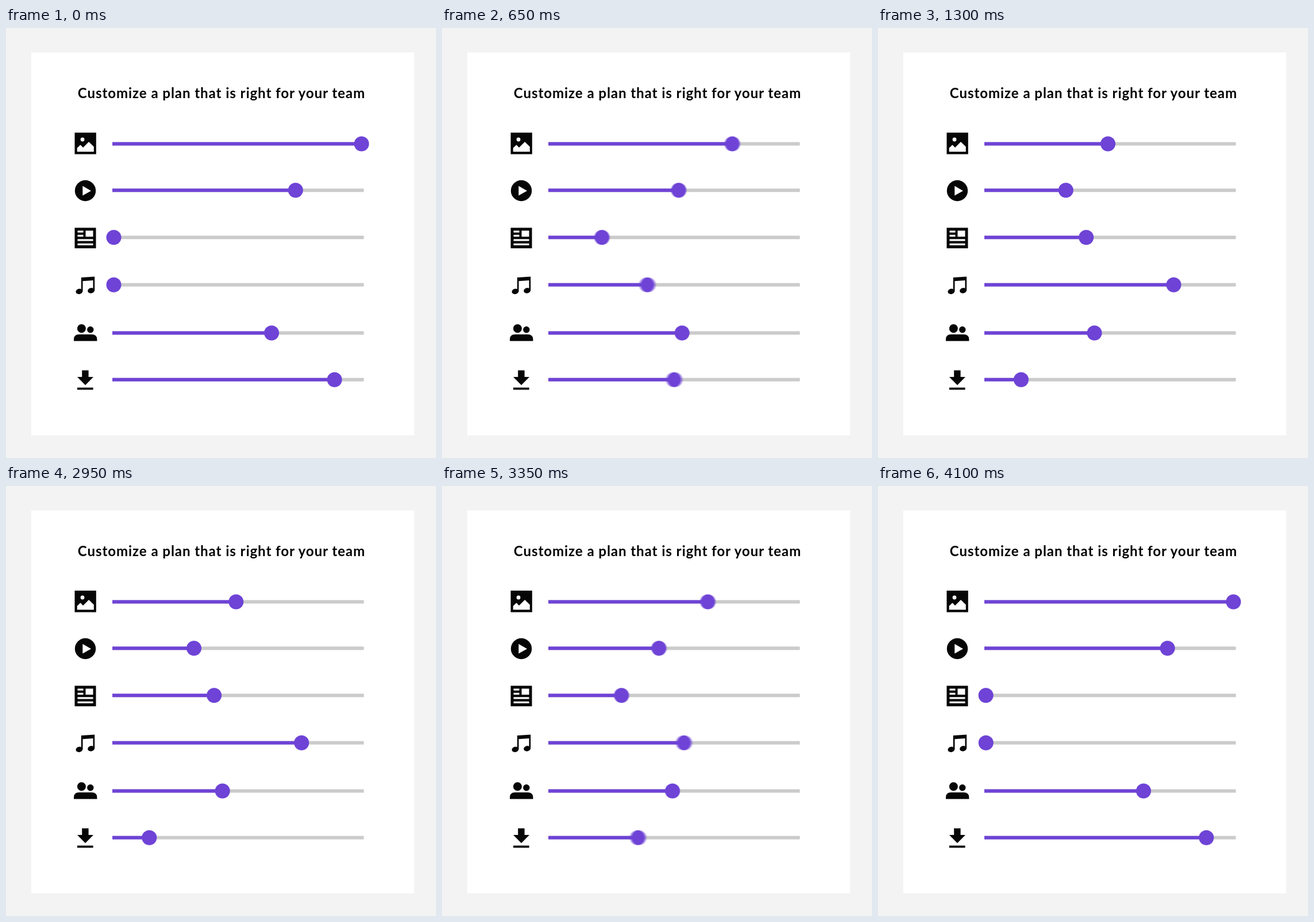
These frames come from a looping animation (748 by 748 pixels, 5350 ms). An HTML page with a canvas:

```html
<!DOCTYPE html>
<html lang="en">
<head>
<meta charset="utf-8">
<title>Plan sliders</title>
<style>
  html, body { margin: 0; width: 100%; height: 100%; overflow: hidden; background: #f3f3f3; }
  svg, canvas { position: absolute; left: 0; top: 0; width: 748px; height: 748px; }
  text { font: 700 24px Lato, sans-serif; letter-spacing: .95px; }
</style>
</head>
<body>
<svg viewBox="0 0 748 748" fill="#060606">
  <rect x="44" y="42.5" width="666" height="666" fill="#fff"/>
  <text x="374.9" y="122" text-anchor="middle" fill="#000">Customize a plan that is right for your team</text>

  <g id="image">
    <rect x="119.5" y="182" width="37.3" height="37.5"/>
    <circle cx="133" cy="194" r="3.4" fill="#fff"/>
    <path d="M123.7 215.3v-6.5l5.8-5.5 4.5 4.7 10-10 8.8 8.5v8.8z" fill="#fff"/>
  </g>
  <g id="video">
    <circle cx="138" cy="283" r="18.2"/>
    <path d="M133.3 274.8v16.8l14.7-8.4z" fill="#fff"/>
  </g>
  <g id="article">
    <rect x="119.5" y="347.5" width="37" height="35.7"/>
    <path d="M124.5 352.5h10v3.2h-10zM124.5 359.7h10v3.3h-10zM138.5 352.5h13v10.5h-13zM124.5 367.2h27v3.2h-27zM124.5 374.7h27v3.2h-27z" fill="#fff"/>
  </g>
  <g id="music">
    <path d="M130.8 434l23.4-1.4V457h-2.7V439l-18 1.2V458h-2.7z"/>
    <ellipse cx="127.4" cy="458.2" rx="6" ry="4.6" transform="rotate(-12 127.4 458.2)"/>
    <ellipse cx="148.1" cy="456.7" rx="6" ry="4.6" transform="rotate(-12 148.1 456.7)"/>
  </g>
  <g id="people">
    <circle cx="131.4" cy="522.8" r="7.5"/>
    <circle cx="146.8" cy="524.7" r="5.7"/>
    <path d="M118 544.5v-3q0-8.5 9-8.5h22q9.4 0 9.4 8.5v3z"/>
  </g>
  <g id="download">
    <path d="M132.2 595.5h11.4V607H152l-14 14.3L124 607h8.2zM124 625.4h27.6v3.8H124z"/>
  </g>
</svg>
<canvas id="stage" width="748" height="748"></canvas>
<script>
  const ctx = document.getElementById('stage').getContext('2d');
  const LOOP = 5350, TICK = 50;
  const LEFT = 185, RIGHT = 622.5, BAR = 6, RADIUS = 13;
  const SHUTTER = 17, SAMPLES = 15;
  const PURPLE = '#6e43d6', GREY = '#cbcbcb';

  // Row centre, knob position before and after the move
  const sliders = [
    [201.5, 618.5, 400],
    [282.3, 503.7, 326.8],
    [364.3, 187.5, 362.2],
    [446.7, 187.5, 514.4],
    [530.5, 462, 376.5],
    [611.7, 571.5, 249]
  ];

  function ease(t, start, end) {
    const k = Math.min(1, Math.max(0, (t - start) / (end - start)));
    return k * k * (3 - 2 * k);
  }

  const progress = t => ease(t, 17, 1251) - ease(t, 2930, 4120);
  const knobX = ([, from, to], t) => from + (to - from) * progress(t);

  function bar(y, x0, x1, color) {
    ctx.fillStyle = color;
    ctx.fillRect(x0, y - BAR / 2, x1 - x0, BAR);
  }

  function draw(t) {
    ctx.clearRect(0, 0, 748, 748);

    // Add up the knobs over the open shutter, then tint them
    ctx.globalCompositeOperation = 'lighter';
    ctx.globalAlpha = 1 / SAMPLES;
    ctx.fillStyle = '#000';
    for (let i = 0; i < SAMPLES; i++) {
      const at = t + SHUTTER * ((i + .5) / SAMPLES - .5);
      for (const s of sliders) {
        ctx.beginPath();
        ctx.arc(knobX(s, at), s[0], RADIUS, 0, 2 * Math.PI);
        ctx.fill();
      }
    }
    ctx.globalAlpha = 1;
    ctx.globalCompositeOperation = 'source-in';
    ctx.fillStyle = PURPLE;
    ctx.fillRect(0, 0, 748, 748);

    ctx.globalCompositeOperation = 'destination-over';
    for (const s of sliders) {
      const x = knobX(s, t);
      bar(s[0], LEFT, x, PURPLE);
      bar(s[0], LEFT, RIGHT, GREY);
    }
    ctx.globalCompositeOperation = 'source-over';
  }

  const begin = performance.now();
  function frame() {
    const t = (performance.now() - begin) % LOOP;
    draw(Math.floor(t / TICK) * TICK);
    requestAnimationFrame(frame);
  }
  frame();
</script>
</body>
</html>
```
